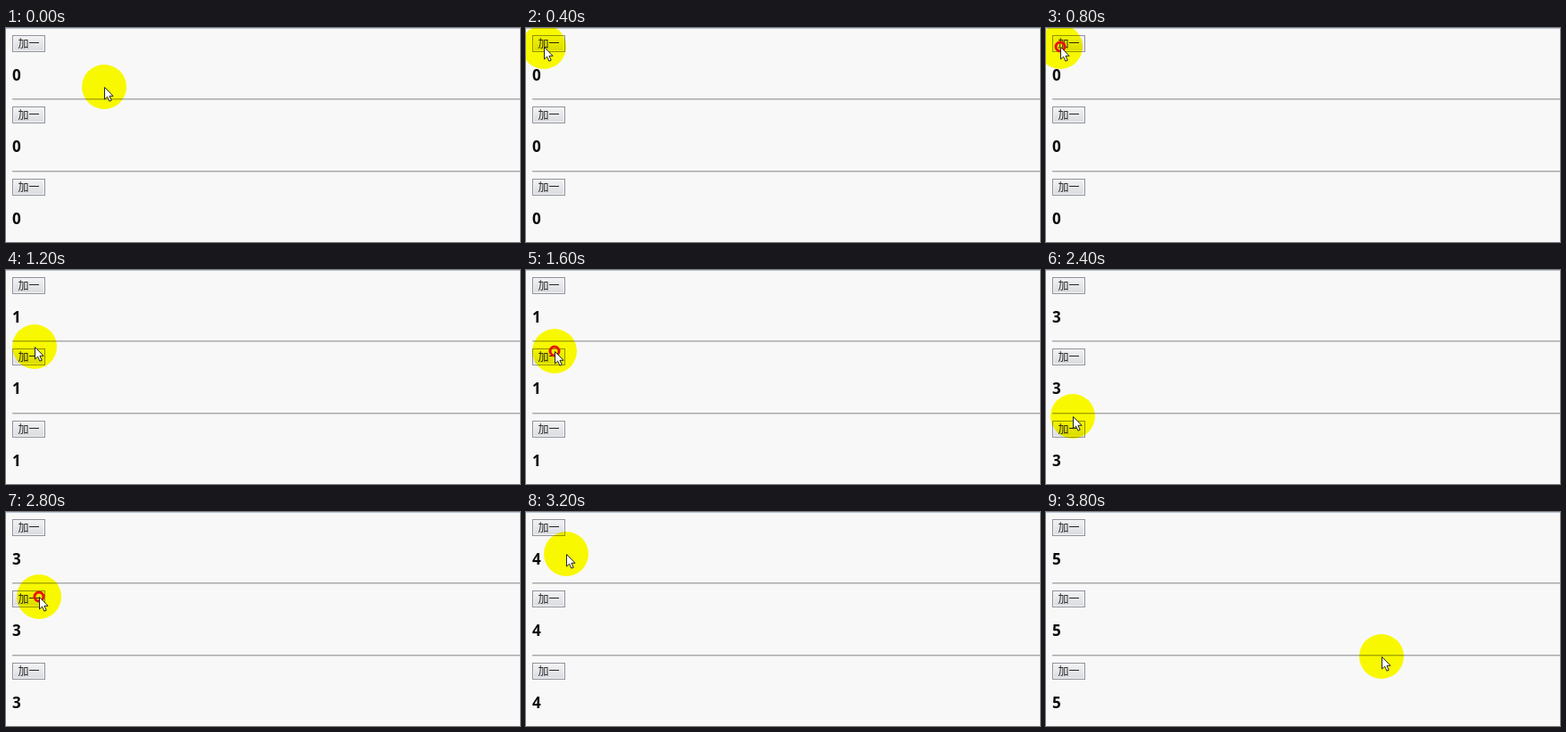
Write an HTML page that moves like this. It is 576 by 240 pixels and loops after 4000 ms.

```html
<!DOCTYPE html>
<html lang="zh">
<head>
<meta charset="utf-8">
<title>加一</title>
<style>
html, body { margin: 0; width: 576px; height: 240px; overflow: hidden; background: #f8f8f8; }
body { position: relative; }
body::before { content: ""; position: absolute; left: 0; top: 0; width: 576px; height: 1px; background: #b9c3d2; }
.row { position: absolute; left: 7px; width: 569px; height: 74px; }
.row:nth-child(1) { top: 8px; }
.row:nth-child(2) { top: 88px; }
.row:nth-child(3) { top: 169px; }
.btn {
  box-sizing: border-box; width: 37px; height: 19px;
  border: 1px solid #8e9299; background: linear-gradient(#f3f3f4, #e6e7ea 50%, #d9dbdf);
  box-shadow: inset 0 0 0 1px #f4f4f5;
  color: #222; text-align: center;
  font: 12px/16px "Noto Sans CJK SC", "Noto Sans CJK JP", "Noto Sans CJK", sans-serif;
}
.num {
  position: absolute; left: 0; top: 33px; width: 20px; height: 24px; overflow: hidden;
  color: #080808; font: bold 17px/24px "Open Sans", "Noto Sans", sans-serif;
}
.num div { animation: count 4s step-end infinite; }
.line { position: absolute; left: 0; top: 71px; width: 569px; height: 1px; background: #a9a9ad; border-bottom: 1px solid #d2d2d5; }

.halo, .pointer { position: absolute; left: 0; top: 0; animation: move 4s step-end infinite; }
.halo { width: 50px; height: 50px; margin: -25px; border-radius: 50%; background: #ff0; mix-blend-mode: multiply; }
.pointer { width: 1px; height: 1px; overflow: visible; }
.ring { fill: none; stroke: #e8140c; stroke-width: 3; animation: press 4s step-end infinite; }

@keyframes count {
  0% { transform: translateY(0); }
  25% { transform: translateY(-24px); }
  45% { transform: translateY(-48px); }
  55% { transform: translateY(-72px); }
  75% { transform: translateY(-96px); }
  90%, 100% { transform: translateY(-120px); }
}
@keyframes move {
  0% { transform: translate(110px, 66px); }
  5% { transform: translate(76px, 42px); }
  10% { transform: translate(20px, 21px); }
  15% { transform: translate(16px, 21px); }
  30% { transform: translate(32px, 86px); }
  35% { transform: translate(32px, 91px); }
  50% { transform: translate(33px, 171px); }
  60% { transform: translate(30px, 164px); }
  65% { transform: translate(37px, 95px); }
  80% { transform: translate(45px, 47px); }
  85% { transform: translate(27px, 21px); }
  95%, 100% { transform: translate(376px, 162px); }
}
@keyframes press {
  0%, 25%, 45%, 75%, 90%, 100% { opacity: 0; }
  20%, 40%, 70%, 85% { opacity: 1; }
}
</style>
</head>
<body>
<div class="row">
  <div class="btn">加一</div>
  <div class="num"><div>0<br>1<br>2<br>3<br>4<br>5</div></div>
  <div class="line"></div>
</div>
<div class="row">
  <div class="btn">加一</div>
  <div class="num"><div>0<br>1<br>2<br>3<br>4<br>5</div></div>
  <div class="line" style="top:72px"></div>
</div>
<div class="row">
  <div class="btn">加一</div>
  <div class="num"><div>0<br>1<br>2<br>3<br>4<br>5</div></div>
</div>
<div class="halo"></div>
<svg class="pointer">
  <circle class="ring" r="5"/>
  <path d="M.5 .5V14l3.1-2.9 2.3 5.1 2.3-1-2.3-4.9H10z" fill="#fff" stroke="#222" stroke-width="1"/>
</svg>
</body>
</html>
```
